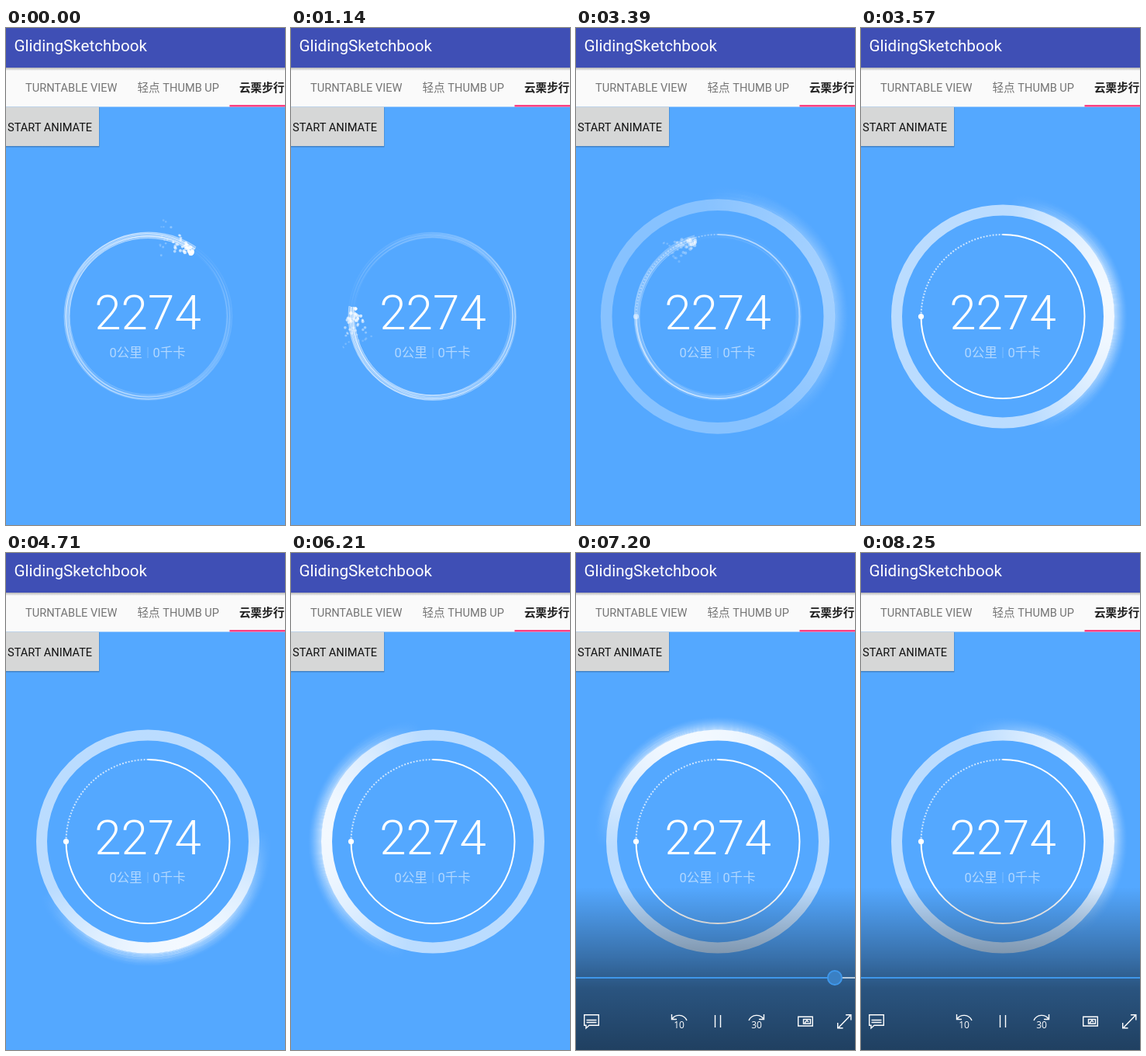
An HTML page with a canvas for the animation above (8.31 s loop, 360 by 640 pixels).

```html
<!DOCTYPE html>
<html lang="zh">
<head>
<meta charset="utf-8">
<title>Step ring</title>
<style>
  html, body { margin: 0; width: 100%; height: 100%; overflow: hidden; background: #54a8ff; }
  canvas, svg { position: absolute; left: 0; top: 0; width: 360px; height: 640px; display: block; }
  text { font-family: Roboto, "Noto Sans CJK SC", "Noto Sans CJK", sans-serif; }
  .tab { font-size: 14.6px; fill: #757575; }
  .skip { font: 12px "Open Sans", sans-serif; fill: #fff; text-anchor: middle; }
  .line { fill: none; stroke: #fff; stroke-width: 1.4; }
</style>
</head>
<body>
<canvas id="rings" width="360" height="640"></canvas>
<svg viewBox="0 0 360 640">
  <defs>
    <linearGradient id="shadow" x2="0" y2="1">
      <stop offset="0" stop-opacity=".28"/><stop offset="1" stop-opacity="0"/>
    </linearGradient>
    <linearGradient id="dim" x2="0" y2="1">
      <stop offset="0" stop-opacity="0"/><stop offset=".43" stop-opacity=".33"/>
      <stop offset=".62" stop-opacity=".5"/><stop offset="1" stop-opacity=".62"/>
    </linearGradient>
  </defs>

  <rect y="51" width="360" height="50.5" fill="#fafafa"/>
  <rect y="51" width="360" height="4" fill="url(#shadow)"/>
  <rect width="360" height="51" fill="#3f4fb5"/>
  <text x="10.5" y="30" font-size="20.6" fill="#fff">GlidingSketchbook</text>
  <text class="tab" x="25" y="82">TURNTABLE VIEW</text>
  <text class="tab" x="169.5" y="82">轻点 THUMB UP</text>
  <text x="301" y="82" font-size="14.6" font-weight="700" fill="#212121">云栗步行</text>
  <rect x="288.5" y="99" width="72" height="2.5" fill="#ff4081"/>
  <rect y="152" width="120.5" height="2.5" fill="url(#shadow)"/>
  <rect x="120" y="102" width="1" height="50" fill-opacity=".12"/>
  <rect y="101.5" width="120" height="50.5" fill="#d6d7d7"/>
  <text x="2" y="132.5" font-size="14.6" fill="#111">START ANIMATE</text>

  <text x="183" y="388" font-size="62" font-weight="300" fill="#fff" text-anchor="middle">2274</text>
  <g font-size="16.5" fill="#fff" fill-opacity=".55">
    <text x="133.5" y="424">0公里</text>
    <text x="189.5" y="424">0千卡</text>
    <rect x="182.5" y="411" width="1" height="14" fill-opacity=".25"/>
  </g>

  <g id="player" opacity="0">
    <rect y="430" width="360" height="210" fill="url(#dim)"/>
    <path d="M0 547H360" stroke="#b9cbdc" stroke-width="2"/>
    <path id="played" stroke="#3f97ea" stroke-width="2"/>
    <circle id="thumb" cy="547" r="9" fill="#3a80c4" stroke="#3f97ea" stroke-width="2"/>
    <g class="line">
      <path d="M10.7 594.7H29.3V608.3H17L13 612V608.3H10.7ZM13.5 601.5H26.5M13.5 604.5H26.5"/>
      <path d="M123.5 594V600.5H130M124 600C128 594 139 593 143 602"/>
      <path d="M242.5 594V600.5H236M242 600C238 594 227 593 223 602"/>
      <path d="M179.5 595V611M186.5 595V611"/>
      <path d="M286.7 597.2H305.3V609H286.7ZM293.5 600.5H302.5V606H293.5ZM295 605L298 602L300 604"/>
      <path d="M338 612L354.5 595M348 594.7H354.8V601.5M337.7 605V611.8H344.5"/>
    </g>
    <text class="skip" x="133" y="612">10</text>
    <text class="skip" x="233" y="612">30</text>
  </g>
</svg>
<script>
const LOOP = 8310, CX = 183, CY = 371.5, TAU = Math.PI * 2;
const ctx = document.getElementById('rings').getContext('2d');
const player = document.getElementById('player');
const played = document.getElementById('played');
const thumb = document.getElementById('thumb');

// The picture refreshes at uneven moments: first singly, then in [from, to, count] runs.
const ticks = [0, 60, 180, 480, 510, 810, 1020, 1140, 1440, 1770, 2100, 2400, 2700, 3000];
const runs = [[3300, 4050, 16], [4140, 4950, 12], [5010, 5820, 11],
              [5850, 6600, 15], [6690, 7470, 19], [7530, 8250, 12]];
for (const [from, to, count] of runs)
  for (let i = 0; i < count; i++)
    ticks.push(Math.round((from + (to - from) * i / (count - 1)) / 30) * 30);

const clamp = v => Math.max(0, Math.min(1, v));
const rad = deg => deg * Math.PI / 180;
const white = a => `rgba(255,255,255,${a.toFixed(3)})`;

let seed = 11;
const random = () => (seed = seed * 16807 % 2147483647) / 2147483647;
const sparks = Array.from({ length: 46 }, () => ({ phase: random(), side: random() - .5, size: random() }));
const strands = Array.from({ length: 9 }, (_, i) => ({
  radius: 101.5 + i * .75, turn: i * 2.4, shift: .6 + random() * 1.6, width: .6 + random() * .7
}));

function sweep(angle, alphaAt) {
  const g = ctx.createConicGradient(angle, CX, CY);
  for (let i = 0; i <= 36; i++) g.addColorStop(i / 36, white(alphaAt(i / 36)));
  return g;
}

function arc(radius, width, style, from = 0, to = TAU, x = CX, y = CY) {
  ctx.beginPath();
  ctx.arc(x, y, radius, from, to);
  ctx.lineWidth = width;
  ctx.strokeStyle = style;
  ctx.stroke();
}

function dot(x, y, radius, alpha) {
  ctx.beginPath();
  ctx.arc(x, y, radius, 0, TAU);
  ctx.fillStyle = white(alpha);
  ctx.fill();
}

function drawComet(t) {
  const head = rad(t < 1140 ? 305 + t * 242 / 1140 : 547 + (t - 1140) * 353 / 1860);
  arc(104.5, 7.5, sweep(head, u => .28 * u));
  const tail = sweep(head, u => .03 + .5 * u);
  for (const s of strands)
    arc(s.radius, s.width, tail, 0, TAU,
      CX + s.shift * Math.cos(s.turn + head), CY + s.shift * Math.sin(s.turn + head));
  for (const s of sparks) {
    const age = ((t / 800 + s.phase) % 1) ** 1.15;
    const back = age * 47;
    const a = head - back / 102;
    const r = 100 + age * 2 + s.side * (4 + back * .95);
    dot(CX + r * Math.cos(a), CY + r * Math.sin(a),
      .9 + (1 - age) * 1.1 + s.size * .6, .92 - age * .75);
  }
}

function drawGlow(t, scale) {
  const angle = rad(186 + (t - 6210) * .072);
  const bell = u => {
    const off = Math.min(u, 1 - u);
    return off < .217 ? Math.cos(off * TAU * 1.15) : 0;
  };
  ctx.save();
  ctx.translate(CX, CY);
  ctx.scale(scale, scale);
  ctx.translate(-CX, -CY);
  for (let k = 0; k < 17; k++)
    arc(144.3 + k, 1.1, sweep(angle, u => .62 * (1 - k / 17) ** 1.5 * bell(u)));
  arc(137, 14, sweep(angle, u => .6 + .33 * bell(u)));
  ctx.restore();
}

function drawGoal() {
  arc(105.5, 2, '#fff', -Math.PI / 2, Math.PI);
  ctx.setLineDash([2, 2]);
  arc(105.5, 2, white(.7), Math.PI, Math.PI * 1.5);
  ctx.setLineDash([]);
  dot(CX - 105.5, CY, 3.6, 1);
}

function render(time) {
  const t = ticks.findLast(tick => tick <= time);
  const shown = clamp((t - 3270) / 240);
  ctx.globalAlpha = 1;
  ctx.fillStyle = '#54a8ff';
  ctx.fillRect(0, 0, 360, 640);
  if (shown < 1) {
    ctx.globalAlpha = 1 - shown;
    drawComet(t);
  }
  if (shown > 0) {
    ctx.globalAlpha = shown;
    drawGlow(t, 1 + .2 * (1 - shown) ** 2);
    drawGoal();
  }
  const x = 327 + (t - 7050) * .046;
  player.setAttribute('opacity', clamp((t - 6940) / 220));
  played.setAttribute('d', `M0 547H${Math.min(360, x)}`);
  thumb.setAttribute('cx', x);
}

const start = performance.now();
function frame() {
  render((performance.now() - start) % LOOP);
  requestAnimationFrame(frame);
}
frame();
</script>
</body>
</html>
```
